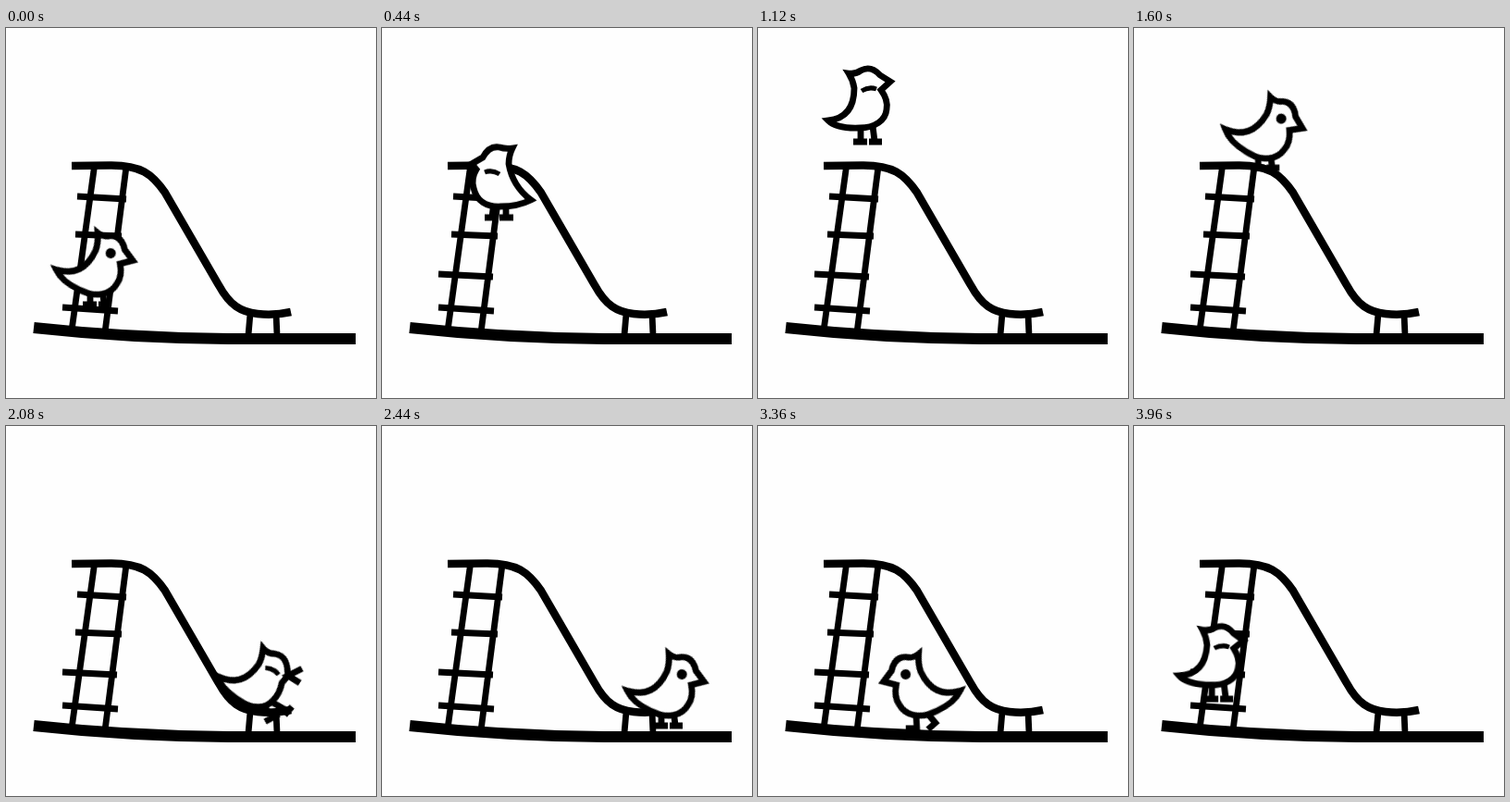
An HTML page that plays this animation: 400 by 400 pixels, repeating every 4000 ms.

```html
<!DOCTYPE html>
<html lang="en">
<head>
<meta charset="utf-8">
<title>Bird on a slide</title>
<style>
  html, body { margin: 0; width: 100%; height: 100%; overflow: hidden; background: #fefefe; }
  svg { display: block; width: 100%; height: 100%; }
  path { fill: none; stroke: #000; stroke-width: 6.8; }
  .slide { stroke-width: 8.5; }
  .ground { stroke-width: 12; }

  .bird, .facing, .body, .outline, .open, .shut, .mouth, .stand, .step-a, .step-b, .sit {
    animation: 4s linear infinite;
  }
  .facing, .outline, .open, .shut, .mouth, .stand, .step-a, .step-b, .sit {
    animation-timing-function: step-end;
  }
  .bird { animation-name: travel; }
  .facing { animation-name: face; }
  .body { animation-name: lean; transform-origin: 0 14px; }
  .outline { animation-name: shape; fill: #fefefe; stroke-miterlimit: 3; }
  .open { animation-name: open; }
  .shut { animation-name: shut; stroke-width: 5; }
  .mouth, .sit { animation-name: ride; }
  .stand { animation-name: stand; }
  .step-a { animation-name: step-a; }
  .step-b { animation-name: step-b; }

  /* 1% is 40 ms */
  @keyframes travel {
    0% { transform: translate(92px, 256px); }
    4% { transform: translate(92px, 256px); animation-timing-function: cubic-bezier(.3, .5, .6, .9); }
    11% { transform: translate(133px, 162px); animation-timing-function: ease-out; }
    13% { transform: translate(134px, 155px); animation-timing-function: ease-in; }
    15%, 19% { transform: translate(130px, 180px); animation-timing-function: cubic-bezier(.2, .6, .4, 1); }
    28%, 29% { transform: translate(112px, 80px); animation-timing-function: ease-in; }
    32%, 37% { transform: translate(106px, 106px); }
    40% { transform: translate(135px, 108px); }
    43% { transform: translate(169px, 128px); }
    47% { transform: translate(211px, 185px); }
    50% { transform: translate(246px, 248px); }
    52% { transform: translate(263px, 272px); }
    55% { transform: translate(279px, 271px); animation-timing-function: ease-out; }
    58% { transform: translate(300px, 258px); animation-timing-function: ease-in; }
    61%, 67% { transform: translate(303px, 281px); }
    71% { transform: translate(303px, 281px); }
    84% { transform: translate(181px, 281px); }
    87% { transform: translate(153px, 281px); animation-timing-function: ease-out; }
    94% { transform: translate(92px, 232px); animation-timing-function: ease-in; }
    99% { transform: translate(85px, 252px); }
    100% { transform: translate(92px, 256px); }
  }
  @keyframes face {
    0%, 17%, 91%, 100% { transform: scaleX(1); }
    4%, 66% { transform: scaleX(-1); }
  }
  @keyframes lean {
    0%, 4%, 15%, 19%, 32%, 38%, 61%, 87%, 100% { transform: rotate(25deg); }
    7%, 13%, 22%, 30%, 58%, 90% { transform: rotate(0deg); }
    43% { transform: rotate(40deg); }
    47% { transform: rotate(50deg); }
    50% { transform: rotate(42deg); }
    52% { transform: rotate(35deg); }
    55% { transform: rotate(30deg); }
    99% { transform: rotate(3deg); }
  }

  /* perched, climbing, upright in the air, beak open */
  @keyframes shape {
    0%, 14%, 31%, 60%, 100% {
      d: path("M-14 -33Q-6 -31 0 -36Q11 -41 20 -29L33 -22L22 -13Q30 -2 28 8C27 21 15 31 -2 31Q-26 32 -38 22Q-8 18 -8 -15Q-9 -24 -14 -33Z");
    }
    5% {
      d: path("M-8 -32Q0 -31 6 -33Q17 -35 24 -22L36 -15L31 -9Q37 1 34 11C31 25 20 32 4 31Q-14 31 -28 24Q-8 9 -4 -15Q-4 -24 -8 -32Z");
    }
    20%, 57%, 89% {
      d: path("M-14 -31Q-6 -30 -1 -34Q10 -40 20 -29L31 -22L21 -13Q29 -2 27 8C26 20 14 28 -2 28Q-27 29 -36 20Q-8 17 -8 -15Q-9 -23 -14 -31Z");
    }
    43% {
      d: path("M-14 -32Q-6 -30 -1 -34Q10 -40 20 -29L25 -23L24 -13Q29 -2 27 8C26 20 14 29 -2 29Q-27 30 -37 21Q-8 17 -8 -15Q-9 -23 -14 -32Z");
    }
  }
  @keyframes open {
    0%, 14%, 31%, 60%, 100% { visibility: visible; }
    5%, 20%, 41%, 89% { visibility: hidden; }
  }
  @keyframes shut {
    0%, 14%, 31%, 60%, 100% { visibility: hidden; }
    5% { visibility: visible; transform: translate(6px, 8px); }
    20%, 89% { visibility: visible; transform: none; }
    41% { visibility: visible; transform: translateY(-4px); }
  }
  @keyframes ride {
    0%, 57%, 100% { visibility: hidden; }
    43% { visibility: visible; }
  }
  @keyframes stand {
    0%, 57%, 87%, 100% { visibility: visible; }
    43%, 68% { visibility: hidden; }
  }
  @keyframes step-a {
    0%, 72%, 80%, 100% { visibility: hidden; }
    68%, 76% { visibility: visible; }
  }
  @keyframes step-b {
    0%, 76%, 87%, 100% { visibility: hidden; }
    72%, 80% { visibility: visible; }
  }
</style>
</head>
<body>
<svg viewBox="0 0 400 400">
  <!-- ladder -->
  <path d="M95.5 150L71 327M130 150L107 329"/>
  <path d="M77 182L130 185M75 223L125 225M61 266L120 269M61 302L121 306"/>
  <!-- slide and ground -->
  <path d="M264 309L262 332M292 309L293 332"/>
  <path class="slide" d="M71 149L112 148.5C146 148 158 158 172 178L230 278C242 300 254 307 272 309Q290 311 308 307"/>
  <path class="ground" d="M30 324Q130 335 240 336L378 336"/>

  <g class="bird">
    <g class="facing">
      <path class="stand" d="M-1 26V43M-9 43H6M12 26L14 42M8 43H22"/>
      <path class="step-a" d="M-3 27V49M14 27L28 37M23 39L38 32M26 43L33 35"/>
      <path class="step-b" d="M10 28L9 46H21M-1 28L-11 40L-3 47"/>
      <g class="body">
        <path class="sit" transform="rotate(-35)" d="M16 24L34 34M30 38L38 29M6 28L20 41M9 45L24 37"/>
        <path class="outline"/>
        <path class="mouth" d="M33 -38L25 -23L40 -24"/>
        <circle class="open" cx="8" cy="-19" r="5.5"/>
        <path class="shut" d="M0 -12Q8 -17 16 -14"/>
      </g>
    </g>
  </g>
</svg>
</body>
</html>
```
